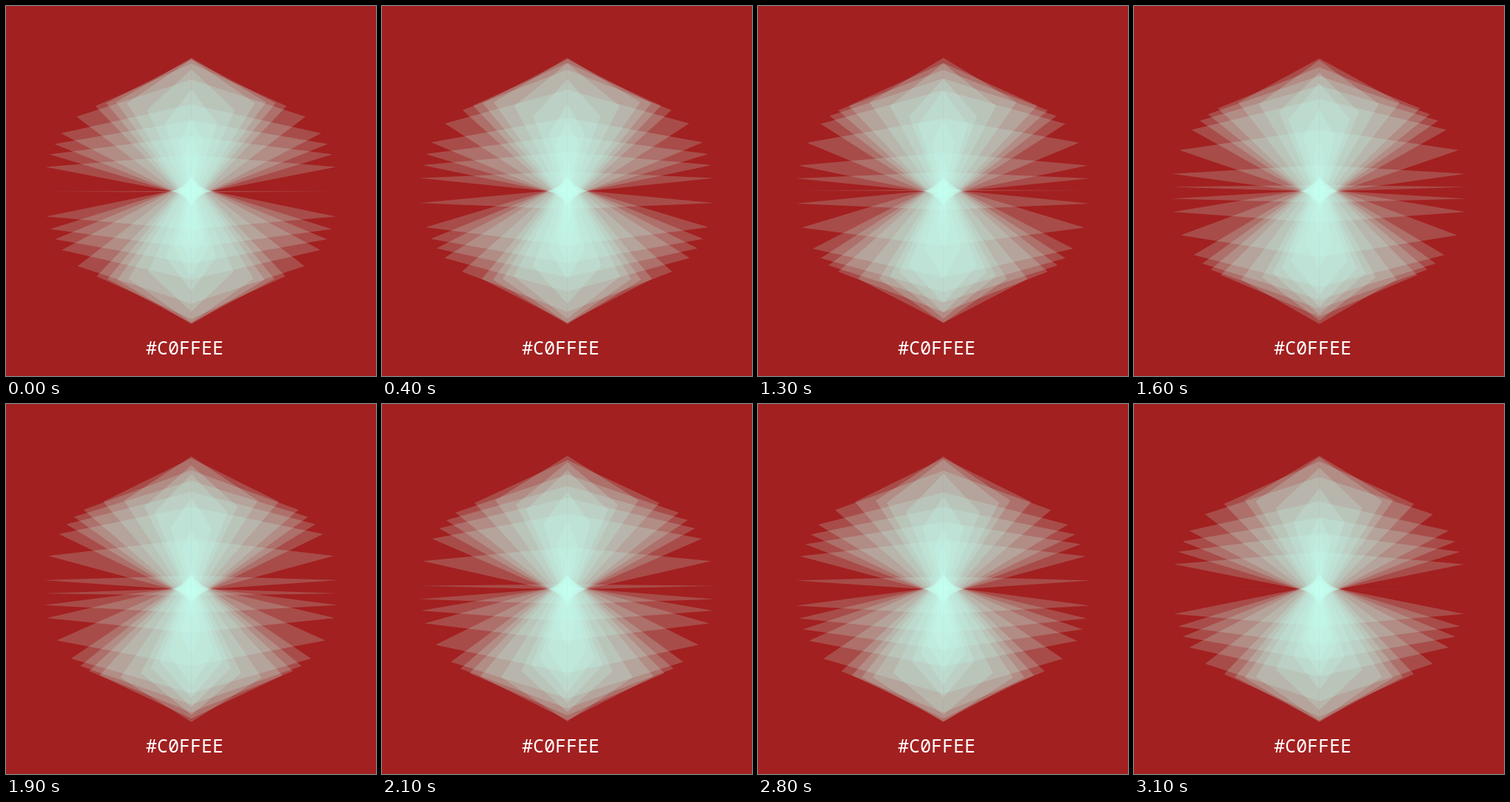
Write an HTML page with a canvas that moves like this. It is 500 px wide and 500 px high and loops after 3200 ms.

```html
<!DOCTYPE html>
<html lang="en">
<head>
<meta charset="utf-8">
<title>Coffee bloom</title>
<style>
  html, body { margin: 0; width: 100%; height: 100%; overflow: hidden; background: #a22020; }
  canvas { display: block; }
  p {
    position: absolute; left: 189px; top: 444px; margin: 0;
    font: 500 25px/34px "Noto Sans Mono", monospace; color: #fff;
  }
</style>
</head>
<body>
<canvas id="stage" width="500" height="500"></canvas>
<p>#C0FFEE</p>
<script>
const ctx = document.getElementById('stage').getContext('2d');
const CENTER = 250, SEAM = 250.5;
const KITES = 30, START = -15.00885;
const STEP_MS = 100, STEPS = 32, TURN_PER_STEP = 0.032;

function drawHalf(tipX, lift) {
  ctx.beginPath();
  ctx.moveTo(SEAM, CENTER - 180 * lift);
  ctx.lineTo(tipX, CENTER - 120 * lift);
  ctx.lineTo(SEAM, CENTER + 20 * lift);
  ctx.fill();
}

function draw(step) {
  ctx.clearRect(0, 0, 500, 500);
  ctx.fillStyle = 'rgba(192, 255, 238, 0.2)';
  // Kites sit one radian apart, so successive turns interleave.
  for (let i = 0; i < KITES; i++) {
    const angle = START + i - step * TURN_PER_STEP;
    const reach = 100 * (1 + Math.cos(angle));
    const lift = Math.sin(angle);
    drawHalf(CENTER - reach, lift);
    drawHalf(CENTER + reach, lift);
  }
}

function tick() {
  draw(Math.floor(performance.now() / STEP_MS) % STEPS);
  requestAnimationFrame(tick);
}
tick();
</script>
</body>
</html>
```
